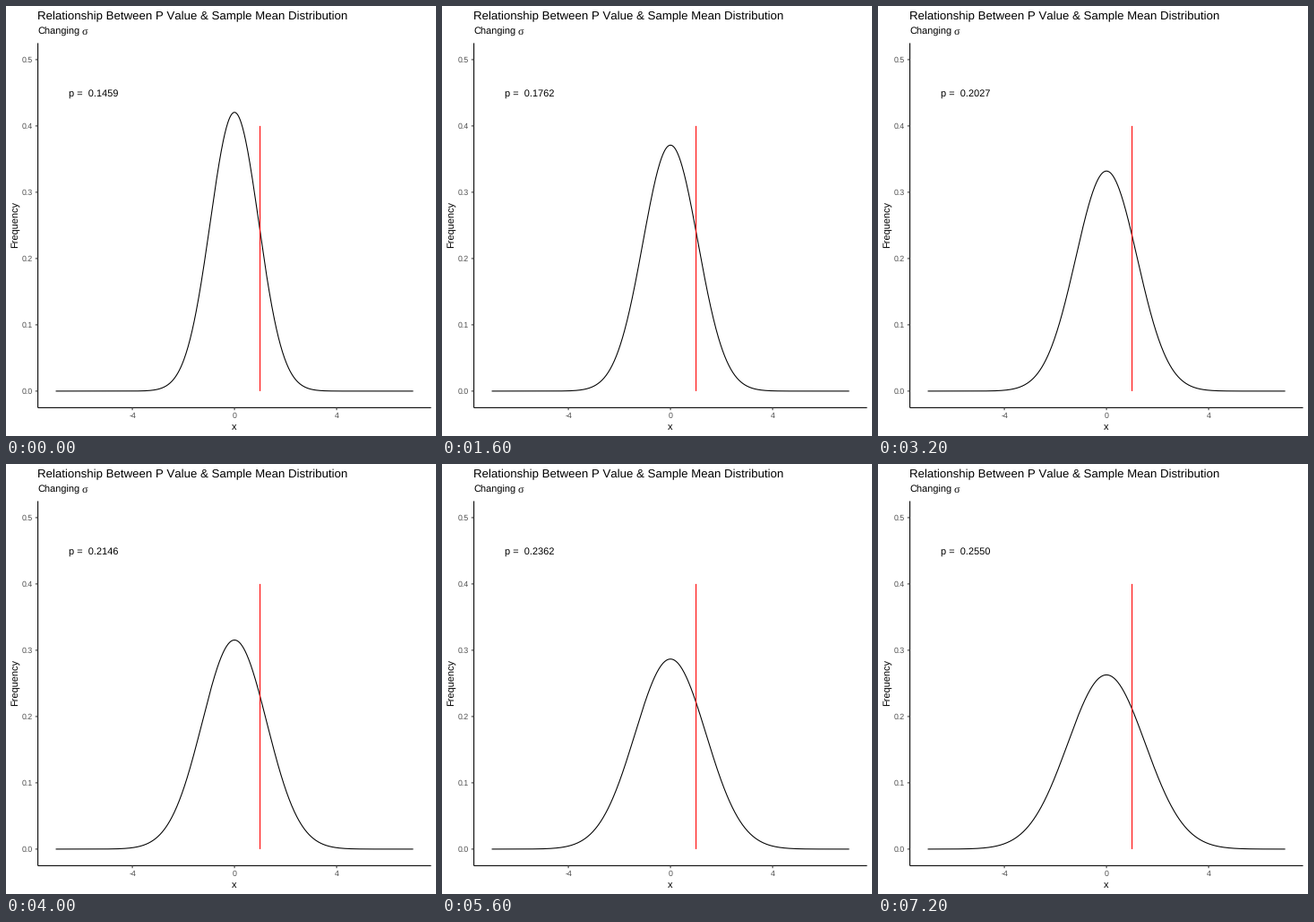
Recreate the animation shown at these times as a matplotlib script. Size 480x480 px, loop 8 s.

```python
import math

import matplotlib.pyplot as plt
import numpy as np
from matplotlib.animation import FuncAnimation

SIZE, DPI = 480, 72          # at 72 dpi one point is one pixel
FRAMES, INTERVAL = 10, 800
LEFT, RIGHT, TOP, BOTTOM = 35.6, 474.5, 41.4, 448.4
LINE = 1.07
MEAN_SHIFT = 1

plt.rcParams.update({
    "font.family": "Liberation Sans",
    "text.hinting": "none",
    "text.kerning_factor": 6,    # plain advance widths
    "toolbar": "None",
})


def px(x):
    return (LEFT + RIGHT) / 2 + 28.5 * x


def py(y):
    return 429.9 - 740 * y


def sigma_at(i):
    """Standard error: spread grows by 0.2 per step with ten samples."""
    return (3 + 0.2 * i) / math.sqrt(10)


def density(x, sigma):
    return np.exp(-0.5 * (x / sigma) ** 2) / (sigma * math.sqrt(2 * math.pi))


def p_value(sigma):
    return 0.5 * math.erfc(MEAN_SHIFT / sigma / math.sqrt(2))


fig = plt.figure(figsize=(SIZE / DPI, SIZE / DPI), dpi=DPI, facecolor="white")
ax = fig.add_axes([0, 0, 1, 1])
ax.set_xlim(0, SIZE)
ax.set_ylim(SIZE, 0)
ax.axis("off")


def stroke(xs, ys, color="black"):
    return ax.plot(xs, ys, color=color, lw=LINE, snap=False,
                   solid_capstyle="butt", solid_joinstyle="round")[0]


def label(x, y, text, size=11, **style):
    return ax.text(x, y, text, fontsize=size, va="baseline", **style)


# Titles
label(35, 15, "Relationship Between P Value & Sample Mean Distribution", 13.2)
label(35, 32, "Changing")
label(85, 32, "σ", 12, family="Liberation Serif")
label(255, 473, "x", ha="center")
label(13, 244, "Frequency", ha="center", rotation=90, rotation_mode="anchor")

# Axes and ticks
stroke([LEFT, LEFT], [TOP, BOTTOM])
stroke([LEFT, RIGHT], [BOTTOM, BOTTOM])
for x in (-4, 0, 4):
    stroke([px(x)] * 2, [BOTTOM, BOTTOM + 2.75], "#333333")
    label(px(x), 460, str(x), 8.8, color="#4d4d4d", ha="center")
for k in range(6):
    y = py(k / 10)
    stroke([LEFT - 2.75, LEFT], [y, y], "#333333")
    label(30, y + 3.2, f"{k / 10:.1f}", 8.8, color="#4d4d4d", ha="right")

# Moving curve, fixed marker and p value
grid = np.linspace(-7, 7, 701)
curve = stroke(px(grid), py(density(grid, sigma_at(0))))
stroke([px(MEAN_SHIFT)] * 2, [py(0), py(0.4)], "red")
readout = label(70, 101, "")


def update(i):
    sigma = sigma_at(i)
    curve.set_ydata(py(density(grid, sigma)))
    readout.set_text(f"p =  {p_value(sigma):.4f}")
    return curve, readout


anim = FuncAnimation(fig, update, frames=FRAMES, interval=INTERVAL,
                     repeat=True, repeat_delay=0, blit=False)
plt.show()
```
